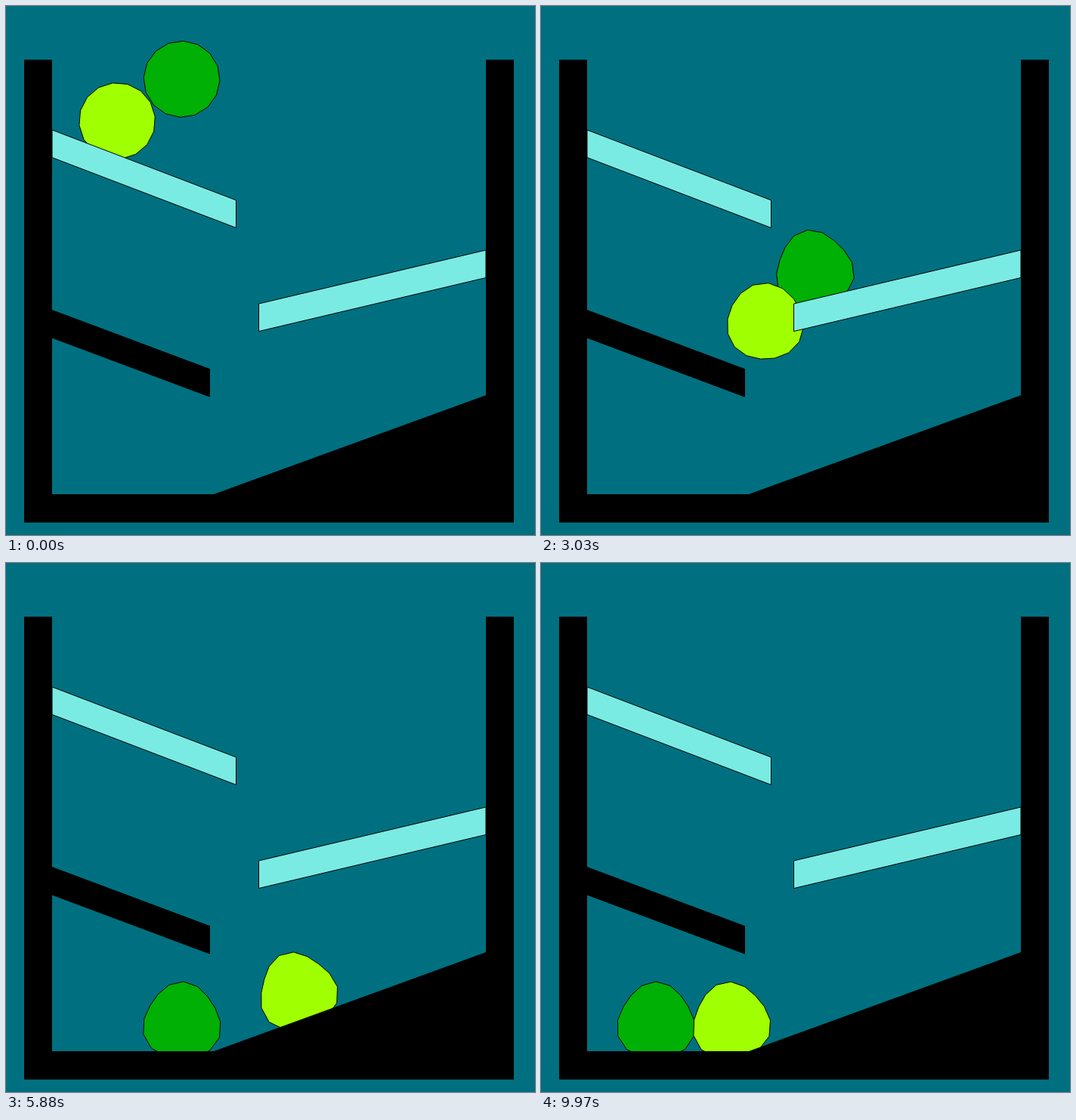
These frames come from a looping animation (700x700 px, 10 s). An HTML page with a canvas:

```html
<!DOCTYPE html>
<html lang="en">
<head>
<meta charset="utf-8">
<title>Soft balls on ramps</title>
<style>
  html, body { margin: 0; width: 100%; height: 100%; overflow: hidden; background: #007080; }
  canvas { display: block; width: 700px; height: 700px; }
</style>
</head>
<body>
<canvas id="stage" width="700" height="700"></canvas>
<script>
const ctx = document.getElementById('stage').getContext('2d');
const LOOP = 10000;
const SIDES = 16;
const RADIUS = 50.5;
const REACH = 52;
const RIDE = 41; // height of a rolling ball's centre above its surface

// A ramp is a slanted top edge with a constant vertical thickness.
const ramp = (x1, y1, x2, y2, color) => ({
  x1, y1, x2, y2, color,
  heightAt: x => y1 + (x - x1) * (y2 - y1) / (x2 - x1)
});
const upper = ramp(61, 164, 304.5, 257, '#7aebe2');
const right = ramp(334.5, 394, 635, 323, '#7aebe2');
const lower = ramp(61, 402.5, 269.5, 480.5, '#000');
const ramps = [upper, right, lower];
const floor = ramp(61, 646, 275, 646);
const bank = ramp(275, 646, 635, 515);
const ground = { heightAt: x => Math.min(646, bank.heightAt(x)) };
const surfaces = [...ramps, floor, bank];

// Every stage moves with constant acceleration. Pace is the starting speed
// relative to the average: 0 from rest, 1 steady, 2 to a stop, above 2 turns back.
const roll = (surface, until, x, pace) => ({ surface, until, x, pace });
const fall = (until, x, y, pace) => ({ until, x, y, pace });

const green = {
  color: '#00b004', x: 232.5, y: 96.5, restX: 152,
  stages: [
    fall(270, 243, 182, 0.9),
    roll(upper, 650, 305, 0.7),
    fall(970, 395, 338, 0.7),
    roll(right, 1780, 586, 1.2),
    roll(right, 2210, 545, 0.8),
    roll(right, 3080, 345, 0.6),
    fall(3450, 298, 445, 0.8),
    fall(3970, 325.5, 558.5, 0.7),
    fall(4060, 350, 577, 1),
    roll(ground, 4970, 281, -3.4),
    roll(ground, 6850, 213, 1.9),
    roll(ground, LOOP, 152, 2)
  ]
};
const yellow = {
  color: '#a0ff00', x: 147, y: 152, restX: 251,
  stages: [
    roll(upper, 900, 305, 0.5),
    fall(1250, 338, 355, 0.6),
    roll(right, 2210, 433, 1.9),
    roll(right, 2800, 340, 0.2),
    fall(3080, 283, 438, 0.7),
    roll(lower, 3970, 217, 2.7),
    roll(lower, 4550, 275, 0.5),
    fall(4970, 320, 513, 0.9),
    fall(5210, 344, 567, 0.9),
    roll(ground, 6250, 357, 11.8),
    roll(ground, 6850, 302, 1.4),
    roll(ground, LOOP, 251, 1.7)
  ]
};

const clamp = (v, lo, hi) => Math.min(hi, Math.max(lo, v));
const mix = (a, b, k) => a + (b - a) * k;

function positionAt(ball, time) {
  let { x, y } = ball, begin = 0;
  for (const stage of ball.stages) {
    const { surface, until, pace } = stage;
    const u = clamp((time - begin) / (until - begin), 0, 1);
    const k = pace * u + (1 - pace) * u * u;
    const nextX = mix(x, stage.x, k);
    if (surface) {
      const rideAt = px => surface.heightAt(px) - RIDE;
      y = rideAt(nextX) + (y - rideAt(x)) * (1 - u) ** 4;
    } else {
      y = mix(y, stage.y, k);
    }
    x = nextX;
    if (time < until) break;
    begin = until;
  }
  return { x, y };
}

// How hard the ball is pressed, and the direction it is pushed in.
function contactAt(x, y) {
  let nx = 0, ny = 0, press = 0;
  for (const { x1, y1, x2, y2 } of surfaces) {
    const sx = x2 - x1, sy = y2 - y1;
    const k = clamp(((x - x1) * sx + (y - y1) * sy) / (sx * sx + sy * sy), 0, 1);
    const dx = x - x1 - k * sx, dy = y - y1 - k * sy;
    const dist = Math.hypot(dx, dy), overlap = Math.max(0, REACH - dist);
    nx += dx / dist * overlap;
    ny += dy / dist * overlap;
    press = Math.max(press, overlap);
  }
  return { press: Math.min(1, press / 17), normal: Math.atan2(ny, nx) };
}

function polygon(points, fill, outlined) {
  ctx.beginPath();
  for (const [x, y] of points) ctx.lineTo(x, y);
  ctx.closePath();
  ctx.fillStyle = fill;
  ctx.fill();
  if (outlined) ctx.stroke();
}

function drawBall(ball, time) {
  const { x, y } = positionAt(ball, time);
  const { press, normal } = contactAt(x, y);
  const squash = press * Math.min(1, time / 200);
  const spin = (x - ball.restX) / 50 - Math.PI / 2;
  const points = Array.from({ length: SIDES }, (_, i) => {
    const angle = spin + i * 2 * Math.PI / SIDES;
    const u = angle - normal;
    const r = RADIUS + squash * (5 * Math.cos(3 * u) - 4 * Math.cos(u));
    return [x + r * Math.cos(angle), y + r * Math.sin(angle)];
  });
  polygon(points, ball.color, true);
}

function drawRamp({ x1, y1, x2, y2, color }) {
  const depth = 36.5;
  polygon([[x1, y1], [x2, y2], [x2, y2 + depth], [x1, y1 + depth]], color, true);
}

function drawContainer() {
  polygon([
    [24, 71], [61, 71], [61, 646], [275, 646], [635, 515],
    [635, 71], [672, 71], [672, 683.5], [24, 683.5]
  ], '#000', false);
}

function draw(now) {
  const time = now % LOOP;
  ctx.fillStyle = '#007080';
  ctx.fillRect(0, 0, 700, 700);
  ctx.strokeStyle = '#000';
  ctx.lineWidth = 1;
  drawBall(green, time);
  drawBall(yellow, time);
  ramps.forEach(drawRamp);
  drawContainer();
}

const start = performance.now();
function tick() {
  draw(performance.now() - start);
  requestAnimationFrame(tick);
}
tick();
</script>
</body>
</html>
```
